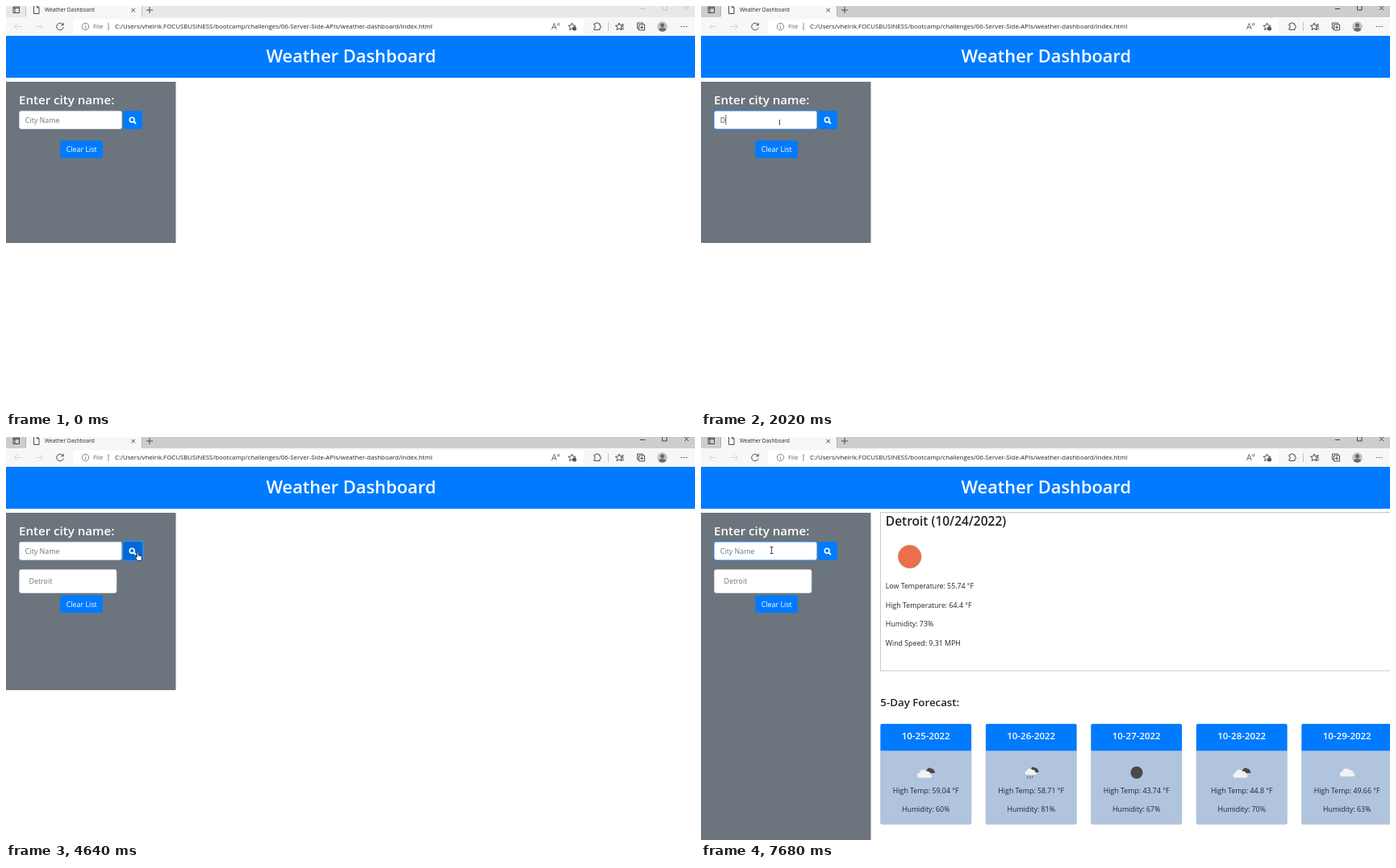
Write an HTML page that moves like this. It is 854 px wide and 500 px high and loops after 8 s.

```html
<!DOCTYPE html>
<html lang="en">
<head>
<meta charset="utf-8">
<title>Weather Dashboard</title>
<style>
  html, body { margin: 0; width: 100%; height: 100%; overflow: hidden; background: #fff; }
  svg { display: block; width: 854px; height: 500px; font: 8.9px "Open Sans", "Noto Sans", sans-serif; fill: #212529; }
  .line { fill: none; stroke: #3b3b3b; stroke-width: .9; }
  .soft { stroke: #d3d3d3; }
  .semi { font-weight: 600; }
  .mid { text-anchor: middle; }
  .white { fill: #fff; }
  .blue { fill: #007bff; }
  .muted { fill: #6c757d; }
  .data { font-size: 8.8px; }
</style>
</head>
<body>
<svg viewBox="0 0 854 500">
  <defs>
    <path id="cloud" d="M-6 5A3 3 0 0 1-6-1A5 5 0 0 1 3-3A4 4 0 0 1 7.5 .5A2.3 2.3 0 0 1 7 5Z"/>
    <path id="star" d="M0-4.5L1.3-1.5L4.6-1.2L2.1 1L2.9 4.2L0 2.5L-2.9 4.2L-2.1 1L-4.6-1.2L-1.3-1.5Z"/>
    <g id="clear"><use href="#cloud" fill="#f2f2f2"/></g>
    <g id="broken">
      <use href="#cloud" fill="#484848" transform="translate(5 -2.5) scale(.66)"/>
      <use href="#cloud" fill="#f2f2f2" transform="translate(-2 1.5)"/>
    </g>
    <g id="rain">
      <use href="#cloud" fill="#484848" transform="translate(3 -3.5) scale(.66)"/>
      <use href="#cloud" fill="#f2f2f2" transform="translate(-1 -1) scale(.78)"/>
      <path d="M-4 4l-1.5 3M-1 4l-1.5 4M2 4l-1.5 3" fill="none" stroke="#555" stroke-width=".9"/>
    </g>
    <g id="night"><circle r="7.6" fill="#484848"/></g>
    <path id="beam" d="M-2-4H2M0-4V4M-2 4H2" class="line" stroke="#222"/>
    <path id="bar" d="M.5-3V4" class="line" stroke="#222"/>
    <path id="arrow" d="M0 0V10.5L2.5 8.2L4.2 12L5.9 11.2L4.2 7.6H7.5Z" fill="#fff" stroke="#111" stroke-width=".7"/>
    <path id="hand" d="M-1.8-3.5Q-.8-5 .1-3.5V-.2L3.8 .7Q4.8 1.2 4.5 2.8L3.6 6.5H-1L-3.8 2.6Q-3.6 1.2-1.8 2.2Z" fill="#fff" stroke="#111" stroke-width=".8"/>
  </defs>

  <!-- tab strip -->
  <rect id="strip" width="854" height="14"/>
  <path d="M22 14Q25 14 25 11V0H168V11Q168 14 171 14Z" fill="#f7f7f7"/>
  <path d="M24.5 0V13M168.5 0V13" class="line" stroke-opacity=".25"/>
  <g class="line">
    <path d="M9 1H16.5V8.5H9ZM9 2.6H16.5M11 2V8.5"/>
    <path d="M34.5-1H38.5L41 2V9.5H34.5ZM38.5-1V2H41"/>
    <path d="M155.5 3L160 7.5M160 3L155.5 7.5M174 5H182M178 1V9"/>
  </g>
  <text x="48" y="7.2" font-size="6.6">Weather Dashboard</text>
  <path id="controls" d="M786 3.5H792M813.5-1H819V5H813.5ZM841 0L846 5M846 0L841 5" class="line"/>

  <!-- toolbar -->
  <rect y="14" width="854" height="23" fill="#f7f7f7"/>
  <rect x="83" y="16.5" width="633" height="18" rx="3" fill="#fff"/>
  <path d="M20 25.5H10.5M14.5 21.5L10.5 25.5L14.5 29.5M36 25.5H45.5M41.5 21.5L45.5 25.5L41.5 29.5" class="line soft"/>
  <g class="line">
    <path d="M70.8 23.5A4.3 4.3 0 1 0 71.2 26.5M71.2 20.8V23.8H68.2"/>
    <g stroke="#666" stroke-width=".8"><circle cx="98.5" cy="25.5" r="4.2"/><path d="M98.5 25V28M98.5 22.9V23.8M127 21V30"/></g>
    <path d="M676.5 29L679.4 21.5L682.3 29M677.5 26.6H681.3M683.2 21.5Q684.4 22.7 683.2 24M685 20.8Q686.5 22.5 685 24.5" stroke-width=".75"/>
    <use href="#star" x="701.5" y="25.5"/>
    <path d="M729 22H731.2A1.4 1.4 0 0 1 734 22H736V24.3A1.4 1.4 0 0 1 736 27.2V29.5H729V27.2A1.4 1.4 0 0 0 729 24.3Z"/>
    <path d="M746.5 20V31" stroke="#bbb"/>
    <use href="#star" x="760" y="25.5"/>
    <path d="M762.5 23H766M763 26H766M763 28.5H766"/>
    <path d="M784 28H782.5V21H789.5V22.5M784.5 23H791.5V30H784.5ZM788 24.5V28.5M786 26.5H790"/>
  </g>
  <circle cx="704.5" cy="28" r="2.6" fill="#555"/>
  <circle cx="813.5" cy="25.5" r="6.3" fill="#c6c4c2"/>
  <path d="M809 30Q809 27 813.5 27T818 30Q813.5 33.5 809 30Z" fill="#6f6b68"/>
  <circle cx="813.5" cy="23.8" r="2.6" fill="#6f6b68"/>
  <path d="M836.7 25.5h1.5m1.6 0h1.5m1.6 0h1.5" class="line" stroke-width="1.4"/>
  <text x="108" y="28.2" font-size="7.9" fill="#666">File</text>
  <text x="135" y="28.2" font-size="7.85">C:/Users/vhelrik.FOCUSBUSINESS/bootcamp/challenges/06-Server-Side-APIs/weather-dashboard/index.html</text>

  <!-- page -->
  <rect y="37" width="854" height="52" class="blue"/>
  <text x="427.7" y="70" font-size="21.8" class="white semi mid">Weather Dashboard</text>
  <rect id="panel" y="94" width="210.5" fill="#6c757d"/>
  <text x="16" y="122" font-size="15.1" class="white semi">Enter city name:</text>
  <rect id="inputRing" x="15" y="128.5" width="130" height="25.5" rx="3.5" fill="#007bff" fill-opacity=".3"/>
  <rect id="field" x="16.5" y="130.3" width="127" height="22.2" rx="2.4" fill="#fff" stroke-width=".8"/>
  <text id="entry" x="23.8" y="145.2"></text>
  <path id="caret" d="M.5 135V147.5" stroke="#333" stroke-width=".8"/>
  <rect id="buttonRing" x="143.4" y="128.2" width="27.4" height="26.2" rx="4" fill="#2790ff" fill-opacity=".6"/>
  <rect id="button" x="145.3" y="130" width="23.7" height="22.7" rx="2.4"/>
  <g fill="none" stroke="#fff" stroke-width="1.6"><circle cx="156.2" cy="141.2" r="2.9"/><path d="M158.4 143.4L161 146" stroke-width="2"/></g>
  <g id="item">
    <rect x="16.5" y="164.5" width="120.5" height="29" rx="2.4" fill="#fff" stroke="#d8dbde" stroke-width=".6"/>
    <text x="28.5" y="182.4" class="muted">Detroit</text>
  </g>
  <g id="clearList">
    <rect x="67.2" y="167" width="52.8" height="21.8" rx="2.4" class="blue"/>
    <text x="93.7" y="181" class="white mid">Clear List</text>
  </g>

  <g id="results">
    <rect x="222.5" y="93.5" width="640" height="196.5" fill="none" stroke="#c3c8cf" stroke-width="1"/>
    <text x="228.8" y="110.2" font-size="15.5" class="semi">Detroit (10/24/2022)</text>
    <circle cx="258.7" cy="148.5" r="14.3" fill="#ec6e4c" stroke="#a98a6c" stroke-width=".6"/>
    <g class="data">
      <text x="228.8" y="188">Low Temperature: 55.74 °F</text>
      <text x="228.8" y="211.7">High Temperature: 64.4 °F</text>
      <text x="228.8" y="235.3">Humidity: 73%</text>
      <text x="228.8" y="258.8">Wind Speed: 9.31 MPH</text>
    </g>
    <text x="222.3" y="333.6" font-size="13.3" class="semi">5-Day Forecast:</text>
    <g id="cards"></g>
  </g>
  <use id="cursor"/>
</svg>
<script>
const LOOP = 8000;
const el = id => document.getElementById(id);
const set = (id, attrs) => { for (const k in attrs) el(id).setAttribute(k, attrs[k]); };
const show = (id, on) => set(id, { visibility: on ? 'visible' : 'hidden' });

const days = [
  ['broken', '59.04', 60], ['rain', '58.71', 81], ['night', '43.74', 67],
  ['broken', '44.8', 70], ['clear', '49.66', 63]
];
el('cards').innerHTML = days.map(([icon, temp, humidity], i) => `
  <g transform="translate(${222.5 + 130.5 * i} 356)">
    <rect width="112.5" height="124.5" rx="2" fill="#b0c4de" stroke="#a9b8cc" stroke-width=".5"/>
    <path d="M0 33.3V2Q0 0 2 0H110.5Q112.5 0 112.5 2V33.3Z" class="blue"/>
    <text x="56.2" y="18.6" font-size="11.5" class="white semi mid">10-${25 + i}-2022</text>
    <use href="#${icon}" x="56.5" y="60.3"/>
    <g class="data mid">
      <text x="56.2" y="85.5">High Temp: ${temp} °F</text>
      <text x="56.2" y="109">Humidity: ${humidity}%</text>
    </g>
  </g>`).join('');

// [start time, value...]; each entry holds until the next
const pointer = [
  [0, ''], [200, 'arrow', 390, 336], [400, 'arrow', 270, 250], [600, 'arrow', 165, 170],
  [800, 'bar', 105, 146], [990, 'bar', 97, 144], [3440, 'beam', 112, 143],
  [3640, 'beam', 138.5, 139.5], [3850, 'hand', 152, 143], [4050, 'hand', 160, 146],
  [4260, 'hand', 164, 147], [5270, 'hand', 160, 146], [5470, 'beam', 139, 144],
  [5670, 'beam', 110, 142], [5850, 'beam', 92, 141], [6050, 'beam', 87.5, 140.5]
];
const typing = [
  [0, ''], [2020, 'D'], [2220, 'De'], [2420, 'Detr'], [2630, 'Detro'],
  [2830, 'Detroi'], [3030, 'Detroit'], [4640, '']
];
const caretOn = [[1390, 1810], [2020, 3440], [4050, 4260], [6250, 6690], [7290, 7680]];

const at = (track, t) => track.findLast(step => step[0] <= t);
const within = (t, a, b) => t >= a && t < b;

function draw(t) {
  const active = t >= 1200, listed = t >= 4640, loaded = t >= 4850;
  set('strip', { fill: active ? '#cdcdcd' : '#e8e8e8' });
  set('controls', { style: `stroke:${active ? '#333' : '#bcbcbc'}` });

  const focused = within(t, 1390, 4260) || t >= 6250;
  show('inputRing', focused);
  set('field', { stroke: focused ? '#80bdff' : '#ced4da' });
  const typed = at(typing, t)[1], entry = el('entry');
  entry.textContent = typed || 'City Name';
  set('entry', { fill: typed ? '#495057' : '#6c757d' });
  const caretX = 23.8 + (typed ? entry.getComputedTextLength() : 0);
  set('caret', { transform: `translate(${caretX} 0)` });
  show('caret', caretOn.some(([a, b]) => within(t, a, b)));

  show('buttonRing', within(t, 4260, 6250));
  set('button', { fill: within(t, 3850, 5470) ? '#0069d9' : '#007bff' });
  set('panel', { height: loaded ? 406 : listed ? 220 : 200 });
  show('item', listed);
  set('clearList', { transform: `translate(0 ${listed ? 29.5 : 0})` });
  show('results', loaded);

  const [, kind, x = 0, y = 0] = at(pointer, t);
  set('cursor', { href: '#' + kind, x, y });
  show('cursor', kind);
}

const start = performance.now();
function frame() {
  draw((performance.now() - start) % LOOP);
  requestAnimationFrame(frame);
}
frame();
</script>
</body>
</html>
```
